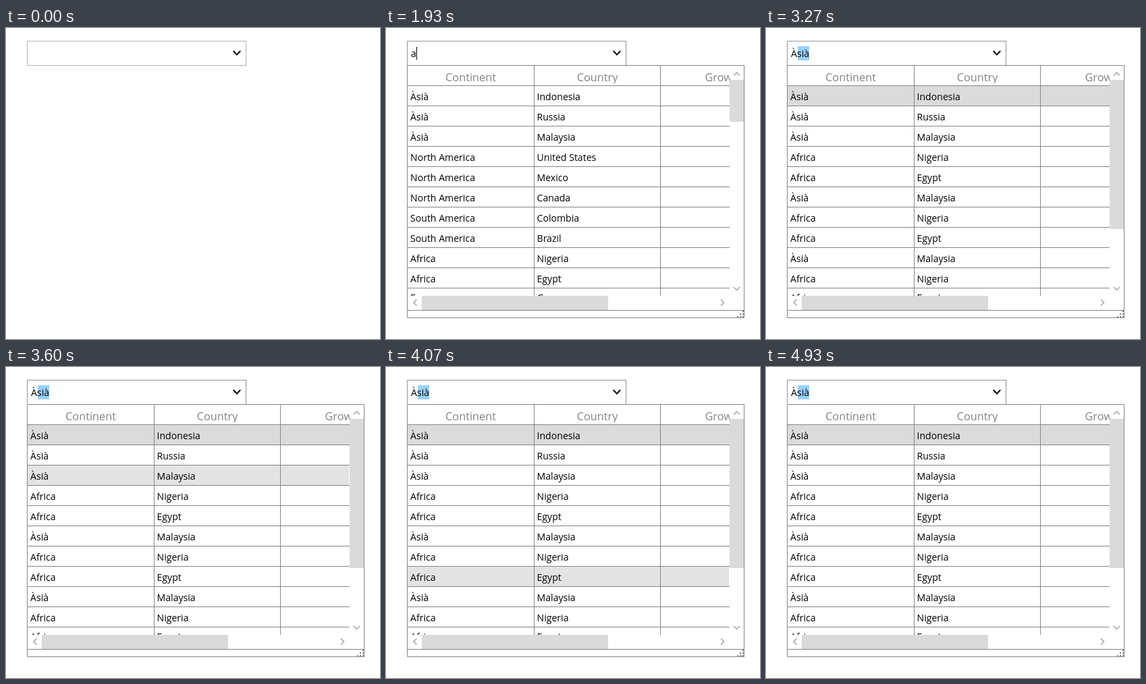
These frames come from a looping animation (554x461 px, 4.99 s). An HTML page:

```html
<!DOCTYPE html>
<html lang="en">
<head>
<meta charset="utf-8">
<title>Multi-column drop-down</title>
<style>
  html, body { margin: 0; width: 100%; height: 100%; overflow: hidden; background: #fff; }
  svg { display: block; width: 554px; height: 461px; font: 14.1px "Open Sans", "Noto Sans", sans-serif; }
  .head { font-size: 16.3px; fill: #838383; text-anchor: middle; }
  .line { fill: none; stroke: #868686; }
  .thumb { fill: #dadada; }
  .arrow { fill: none; stroke: #a3a3a3; stroke-width: 1.5; }
  .box, .caret, .popup, .typed, .filtered, .hover { animation: 4990ms step-end infinite; }
  .box { fill: #fff; animation-name: focus; }
  .caret { animation-name: blink; }
  .popup { animation-name: open; }
  .typed { animation-name: typed; }
  .filtered { animation-name: filtered; }
  .hover { fill: #e3e3e3; animation-name: hover; }

  @keyframes focus {
    0% { stroke: #b3b3b3; }
    2.605% { stroke: #b3b3b3; animation-timing-function: linear; }
    8.016% { stroke: #a2a2a2; }
    18.637%, 100% { stroke: #949494; }
  }
  @keyframes blink {
    0% { opacity: 0; }
    18.637% { opacity: 1; }
    30.661%, 100% { opacity: 0; }
  }
  @keyframes open {
    0% { opacity: 0; }
    38.677%, 100% { opacity: 1; }
  }
  @keyframes typed {
    0% { opacity: 0; }
    38.677% { opacity: 1; }
    50.701%, 100% { opacity: 0; }
  }
  @keyframes filtered {
    0% { opacity: 0; }
    50.701%, 100% { opacity: 1; }
  }
  @keyframes hover {
    0% { opacity: 0; transform: none; }
    72.144% { opacity: 1; transform: none; }
    73.547% { opacity: 1; transform: translateY(30px); }
    76.152% { opacity: 1; transform: translateY(60px); }
    77.555% { opacity: 1; transform: translateY(90px); }
    80.16% { opacity: 1; transform: translateY(120px); }
    81.563% { opacity: 1; transform: translateY(150px); }
    82.766% { opacity: 1; transform: translateY(210px); }
    84.168%, 100% { opacity: 0; transform: none; }
  }
</style>
</head>
<body>
<svg viewBox="0 0 554 461">
  <clipPath id="cells"><rect x="32" y="56" width="477" height="341"/></clipPath>
  <clipPath id="heads"><rect x="32" y="56" width="478" height="26"/></clipPath>

  <rect class="box" x="31.5" y="19.5" width="324" height="36"/>
  <path d="M336.8 34 342 39.6 347.2 34" fill="none" stroke="#000" stroke-width="2"/>
  <rect class="caret" x="36" y="27" width="1" height="20"/>

  <g class="popup">
    <rect x="31.5" y="55.5" width="499" height="374" fill="#fff"/>
    <g clip-path="url(#cells)">
      <g class="filtered">
        <rect x="32" y="86" width="477" height="29" fill="#dbdbdb"/>
        <rect class="hover" x="32" y="146" width="476" height="29"/>
      </g>
      <path class="line" id="grid"/>
      <g class="typed" id="all"></g>
      <g class="filtered" id="matches"></g>
    </g>
    <g class="head" clip-path="url(#heads)">
      <text x="125.5" y="79">Continent</text>
      <text x="313" y="79">Country</text>
      <text x="500.5" y="79">Growth</text>
    </g>
    <rect class="thumb" x="53" y="397" width="276" height="21"/>
    <rect class="thumb typed" x="509" y="77" width="21" height="62"/>
    <rect class="thumb filtered" x="509" y="77" width="21" height="221"/>
    <path class="arrow" d="M515 70.5 519.5 66 524 70.5M515 384 519.5 388.5 524 384M45.500 402.500 41 407 45.500 411.500M496 402.500 500.500 407 496 411.500"/>
    <path class="line" d="M31.5 55.5H530.5V429.5H31.5ZM32 418.500H530"/>
    <path id="grip" fill="#808080"/>
  </g>

  <g class="typed">
    <text x="37" y="43">a</text>
    <rect x="45" y="28" width="1" height="19"/>
  </g>
  <g class="filtered">
    <rect x="47" y="27" width="17" height="21" fill="#99d1ff"/>
    <text x="37" y="43">Àsià</text>
  </g>
</svg>
<script>
  const el = id => document.getElementById(id);
  const continents = {
    Indonesia: "Àsià", Russia: "Àsià", Malaysia: "Àsià",
    "United States": "North America", Mexico: "North America", Canada: "North America",
    Colombia: "South America", Brazil: "South America",
    Nigeria: "Africa", Egypt: "Africa", Germany: "Europe"
  };

  // The last row is only partly visible above the scroll bar.
  function fill(id, countries) {
    el(id).innerHTML = countries.map((name, i) => {
      const y = i < 10 ? 107 + i * 30 : 405;
      return `<text x="36" y="${y}">${continents[name]}</text><text x="223.5" y="${y}">${name}</text>`;
    }).join("");
  }

  const trio = ["Malaysia", "Nigeria", "Egypt"];
  fill("all", Object.keys(continents));
  fill("matches", ["Indonesia", "Russia", ...trio, ...trio, ...trio]);

  let grid = "M219.5 56V397M406.5 56V397";
  for (let y = 85.5; y < 397; y += 30) grid += `M32 ${y}H509`;
  el("grid").setAttribute("d", grid);

  let dots = "";
  for (let row = 0; row < 3; row++)
    for (let col = 2 - row; col < 3; col++)
      dots += `M${520 + col * 4} ${419 + row * 4}h2v2h-2z`;
  el("grip").setAttribute("d", dots);
</script>
</body>
</html>
```
